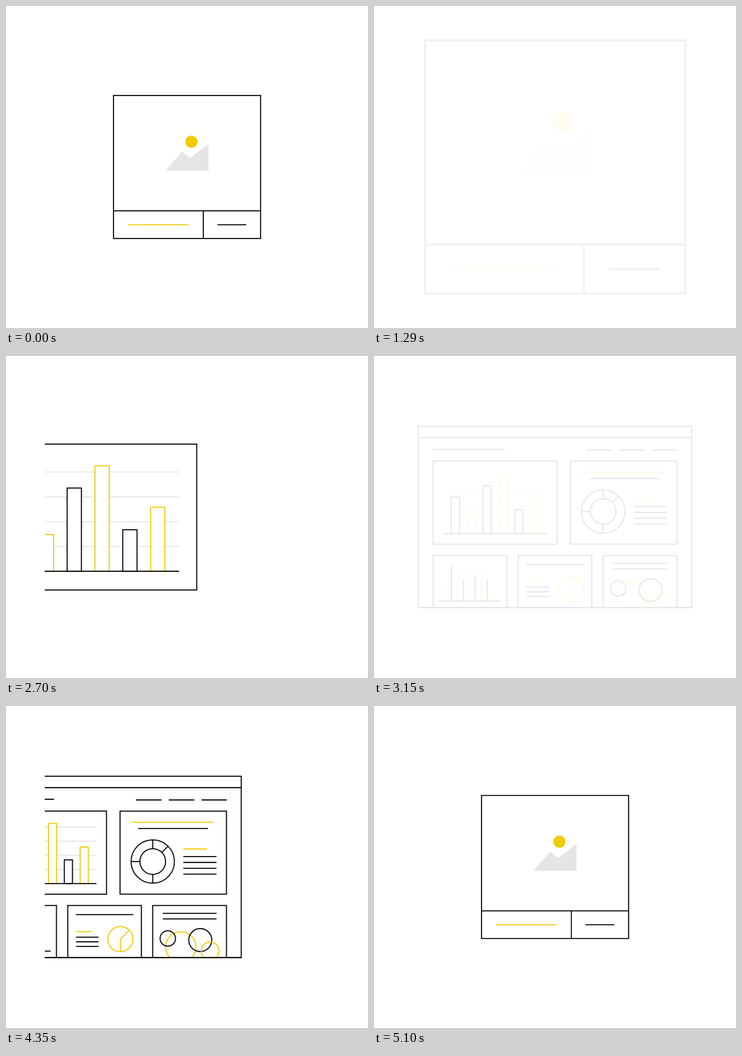
An HTML page for the animation above (6 s loop, 794 by 706 pixels).

```html
<!DOCTYPE html>
<html lang="en">
<head>
<meta charset="utf-8">
<title>Wireframes</title>
<style>
  html, body { margin: 0; width: 100%; height: 100%; overflow: hidden; background: #fff; }
  svg { display: block; width: 794px; height: 706px; fill: none; stroke-width: 2.3; }
  #card { transform-origin: 397px 353px; }
  #chart, #board { opacity: 0; }
</style>
</head>
<body>
<svg viewBox="0 0 794 706">
  <clipPath id="window"><rect x="85" y="0" width="624" height="706"/></clipPath>
  <clipPath id="page"><rect x="85" y="0" width="624" height="552"/></clipPath>
  <g id="card"></g>
  <g clip-path="url(#window)"><g id="chart"></g></g>
  <g clip-path="url(#window)"><g id="board"></g></g>
</svg>
<script>
const INK = '#000', GOLD = '#f0cb05', GREY = '#e5e5e5';
const LOOP = 6000;
const el = id => document.getElementById(id);

const line = (x1, y1, x2, y2, c = INK) =>
  `<path d="M${x1} ${y1}L${x2} ${y2}" stroke="${c}"/>`;
const row = (x1, x2, y, c) => line(x1, y, x2, y, c);
const box = (x1, y1, x2, y2, c = INK) =>
  `<rect x="${x1}" y="${y1}" width="${x2 - x1}" height="${y2 - y1}" stroke="${c}" fill="#fff"/>`;
const ring = (x, y, r, c = INK) => `<circle cx="${x}" cy="${y}" r="${r}" stroke="${c}"/>`;

// Framed bar chart; (x, y) is the left end of the baseline, k the scale.
function barChart(x, y, k) {
  const bars = [140.3, 80.3, 182.5, 231.2, 91, 140.3];
  let s = box(x - 39.3 * k, y - 278.8 * k, x + 437.3 * k, y + 41 * k);
  for (let i = 1; i <= 4; i++) s += row(x, x + 398.5 * k, y - 54.4 * i * k, GREY);
  bars.forEach((h, i) => {
    const left = x + (31 + 61 * i) * k;
    s += box(left, y - h * k, left + 31.3 * k, y, i % 2 ? GOLD : INK);
  });
  return s + row(x, x + 398.5 * k, y);
}

el('card').innerHTML =
  box(235.8, 196.2, 558.4, 509.8) +
  row(235.8, 558.4, 449.1) +
  line(432.8, 449, 432.8, 510) +
  row(268, 400.5, 479.6, GOLD) +
  row(464, 527, 479.6) +
  `<path d="M349.5 361.2L386 319.5L404 333.3L444.3 301.7V361.2Z" fill="${GREY}"/>` +
  `<circle cx="406.7" cy="297.5" r="13.3" fill="${GOLD}"/>`;

el('chart').innerHTML = barChart(198, 472, 1);

const sticks = [502, 460, 473, 491.5, 473, 481, 468.5, 488, 520];
el('board').innerHTML =
  box(97.1, 154, 696.8, 551.7) +
  row(97, 697, 179) +
  row(128.7, 286, 204.5) +
  row(466, 522, 206) + row(538, 594, 206) + row(609.5, 665.3, 206) +
  barChart(152, 389.3, 0.57) +
  // donut panel
  box(431, 230.5, 664.4, 412.5) +
  row(458, 637, 254.8, GOLD) + row(471, 624, 268.6) +
  ring(502.7, 341, 47.4) + ring(502.7, 341, 28.2) +
  line(502.7, 293.6, 502.7, 312.8) + line(502.7, 369.2, 502.7, 388.4) +
  line(455.3, 341, 474.5, 341) + line(522.6, 321, 536.3, 307.5) +
  row(569.8, 622, 313.5, GOLD) +
  [330.2, 343, 355.8, 368.6].map(y => row(569.8, 642.5, y)).join('') +
  // lower panels, cut off by the page edge
  [[129.7, 291.5], [316.3, 477.8], [502.6, 664.4]]
    .map(([a, b]) => `<path d="M${a} 551.7V437.4H${b}V551.7" stroke="${INK}"/>`).join('') +
  sticks.map((y, i) => line(156.8 + 13 * i, y, 156.8 + 13 * i, 537.3, i % 2 ? INK : GOLD)).join('') +
  row(142.3, 279, 537.4) +
  row(334, 460, 457.3) + row(334.5, 369, 494.8, GOLD) +
  [506.9, 517, 527.2].map(y => row(334.5, 384, y)).join('') +
  ring(431.8, 511.2, 27.5, GOLD) +
  `<path d="M431.8 538.7V511.2L451.2 491.8" stroke="${GOLD}"/>` +
  row(524.5, 642.7, 454.6) + row(524.5, 642.7, 466.8) +
  `<g clip-path="url(#page)">` +
  ring(564.2, 528.5, 33.3, GOLD) + ring(535.7, 509.7, 16.9) +
  ring(606.9, 513.2, 25.2) + ring(628.6, 537, 19.5, GOLD) + '</g>' +
  row(96, 698, 551.7);

// Steps: [ms, value, easing to the next step]
function play(id, prop, steps) {
  el(id).animate(
    steps.map(([t, v, easing = 'linear']) => ({ offset: t / LOOP, [prop]: v, easing })),
    { duration: LOOP, iterations: Infinity });
}

const GROW = 'cubic-bezier(.333, .447, .667, .78)';
const LEAVE = 'cubic-bezier(.35, .15, .7, .6)';

play('card', 'opacity', [[0, 1], [937, 1], [1312, 0], [4732, 0], [5110, 1], [LOOP, 1]]);
play('card', 'transform', [[0, 'scale(1)'], [937, 'scale(1)', GROW], [1312, 'scale(1.8)'],
  [1400, 'scale(1.8)'], [1400, 'scale(1)'], [LOOP, 'scale(1)']]);

function visit(id, from, leave, gone, dist) {
  const home = 'translateX(0px)', away = `translateX(${-dist}px)`;
  play(id, 'opacity', [[0, 0], [from, 0], [from + 375, 1], [gone, 1], [gone, 0], [LOOP, 0]]);
  play(id, 'transform', [[0, home], [leave, home, LEAVE], [gone, away], [LOOP, away]]);
}
visit('chart', 1642, 2585, 2815, 555);
visit('board', 3112, 4270, 4468, 615);
</script>
</body>
</html>
```
